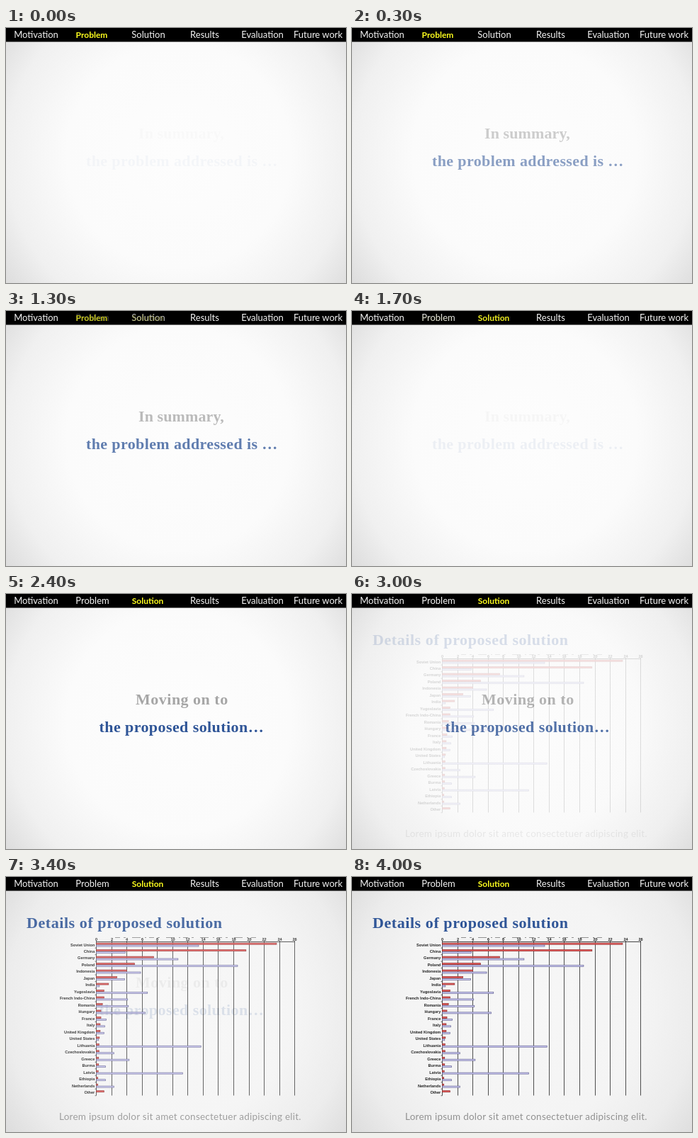
Recreate the animation shown at these times as an HTML page. Size 480x360 px, loop 4.7 s.

```html
<!DOCTYPE html>
<html lang="en">
<head>
<meta charset="utf-8">
<title>Slide transitions</title>
<style>
  html, body { margin: 0; width: 100%; height: 100%; overflow: hidden; background: #fff; }
  svg { display: block; width: 480px; height: 360px; }
  .nav { font: 13px Lato, sans-serif; fill: #f4f4f4; text-anchor: middle; }
  .nav .on { font-size: 12px; font-weight: 700; fill: #ffff1e; }
  .big { font: bold 22px "Liberation Serif", serif; fill: #2f5597; }
  .big .soft { fill: #a6a6a6; }
  .foot { font: 13.5px Lato, sans-serif; letter-spacing: .25px; fill: #919191; }
  .chart { font: bold 5.6px "Liberation Sans", sans-serif; fill: #222; }
</style>
</head>
<body>
<svg viewBox="0 0 480 360">
  <defs>
    <radialGradient id="light" gradientUnits="userSpaceOnUse" cx="244" cy="180" r="305">
      <stop offset="0" stop-color="#fdfdfd"/>
      <stop offset=".52" stop-color="#fbfbfb"/>
      <stop offset=".8" stop-color="#f0f0f0"/>
      <stop offset="1" stop-color="#dcdcdc"/>
    </radialGradient>
    <radialGradient id="paper" gradientUnits="userSpaceOnUse" cx="244" cy="180" r="305">
      <stop offset="0" stop-color="#f7f7f7"/>
      <stop offset=".55" stop-color="#f4f4f4"/>
      <stop offset=".8" stop-color="#ececec"/>
      <stop offset="1" stop-color="#dcdcdc"/>
    </radialGradient>
  </defs>
  <rect width="480" height="360" fill="url(#light)"/>
  <rect id="sheet" width="480" height="360" fill="url(#paper)"/>
  <g id="summary" class="big">
    <text class="soft" x="187" y="156" letter-spacing=".1">In summary,</text>
    <text x="113" y="194.5" letter-spacing=".38">the problem addressed is …</text>
  </g>
  <g id="moving" class="big">
    <text class="soft" x="183" y="156" letter-spacing=".5">Moving on to</text>
    <text x="131.5" y="194.5" letter-spacing=".42">the proposed solution…</text>
  </g>
  <g id="details">
    <text class="big" x="29" y="72" letter-spacing=".57">Details of proposed solution</text>
    <g id="chart" class="chart"></g>
    <text class="foot" x="75" y="342.5">Lorem ipsum dolor sit amet consectetuer adipiscing elit.</text>
  </g>
  <rect width="480" height="19.5" fill="#000"/>
  <g id="nav" class="nav"></g>
</svg>
<script>
const LOOP = 4700, STEP = 100, FADE = 580;
const $ = id => document.getElementById(id);

function add(parent, tag, attrs, text) {
  const el = document.createElementNS('http://www.w3.org/2000/svg', tag);
  for (const k in attrs) el.setAttribute(k, attrs[k]);
  if (text !== undefined) el.textContent = text;
  return parent.appendChild(el);
}

// Navigation bar
const tabs = {};
[['Motivation', 42.5], ['Problem', 122], ['Solution', 201],
 ['Results', 280.5], ['Evaluation', 362], ['Future work', 440.5]].forEach(([name, x]) => {
  tabs[name] = { off: add($('nav'), 'text', { x, y: 14 }, name) };
  if (name === 'Problem' || name === 'Solution')
    tabs[name].on = add($('nav'), 'text', { x: x - 1, y: 14, class: 'on' }, name);
});

// Bar chart: name, red value, blue value
const rows = [
  ['Soviet Union', 23.6, 13.4], ['China', 19.6, 3.8], ['Germany', 7.5, 10.7],
  ['Poland', 5, 18.5], ['Indonesia', 4, 5.8], ['Japan', 2.7, 3.7],
  ['India', 1.6, .4], ['Yugoslavia', 1, 6.7], ['French Indo-China', 1, 4.1],
  ['Romania', .8, 4.2], ['Hungary', .6, 6.4], ['France', .6, 1.3],
  ['Italy', .5, 1.1], ['United Kingdom', .5, 1], ['United States', .4, .3],
  ['Lithuania', .35, 13.7], ['Czechoslovakia', .35, 2.3], ['Greece', .3, 4.3],
  ['Burma', .3, 1.2], ['Latvia', .25, 11.3], ['Ethiopia', .2, 1.2],
  ['Netherlands', .2, 2.3], ['Other', 1, 0]
];
const X0 = 127.5, UNIT = 10.78, TOP = 91.5, BOTTOM = 308.5;

function bar(y, value, fill, stroke) {
  if (value) add($('chart'), 'rect', {
    x: X0, y, width: value * UNIT, height: 2, fill, stroke, 'stroke-width': .75
  });
}

function drawChart() {
  const g = $('chart');
  add(g, 'path', { d: 'M154 85.5H355', stroke: '#777', 'stroke-width': .8, 'stroke-dasharray': '7 5 3 9 12 6 2 4' });
  for (let v = 0; v <= 26; v += 2) {
    const x = Math.round(X0 + v * UNIT - .5) + .5;
    add(g, 'path', { d: `M${x} ${TOP - 1.5}V${BOTTOM}`, stroke: '#3c3c3c', 'stroke-width': .9 });
    add(g, 'text', { x, y: 90, 'text-anchor': 'middle' }, v);
  }
  add(g, 'path', { d: `M${X0} ${TOP}H408`, stroke: '#333', 'stroke-width': .9 });
  rows.forEach(([name, red, blue], i) => {
    const y = 95.5 + i * 9.477;
    add(g, 'path', { d: `M${X0 - 2} ${y + 4.7}h2`, stroke: '#333', 'stroke-width': .7 });
    add(g, 'text', { x: 125.3, y: y + 2, 'text-anchor': 'end' }, name);
    bar(y - 2.3, red, '#f06060', '#8c2a2a');
    bar(y + .6, blue, '#d8d4ff', '#686894');
  });
}

const fade = (t, start) => Math.min(1, Math.max(0, (t - start) / FADE));
const show = (el, a) => { el.style.opacity = a; };

function draw(ms) {
  const t = Math.floor(ms % LOOP / STEP) * STEP;
  const swap = fade(t, 1160), last = fade(t, 2900);
  show($('summary'), fade(t, -20) * (1 - swap));
  show($('moving'), fade(t, 1740) * (1 - last));
  show($('details'), last);
  show($('sheet'), last);
  show(tabs.Problem.on, 1 - swap);
  show(tabs.Problem.off, swap);
  show(tabs.Solution.on, swap);
  show(tabs.Solution.off, 1 - swap);
}

drawChart();
const start = performance.now();
function tick() {
  draw(performance.now() - start);
  requestAnimationFrame(tick);
}
tick();
</script>
</body>
</html>
```
